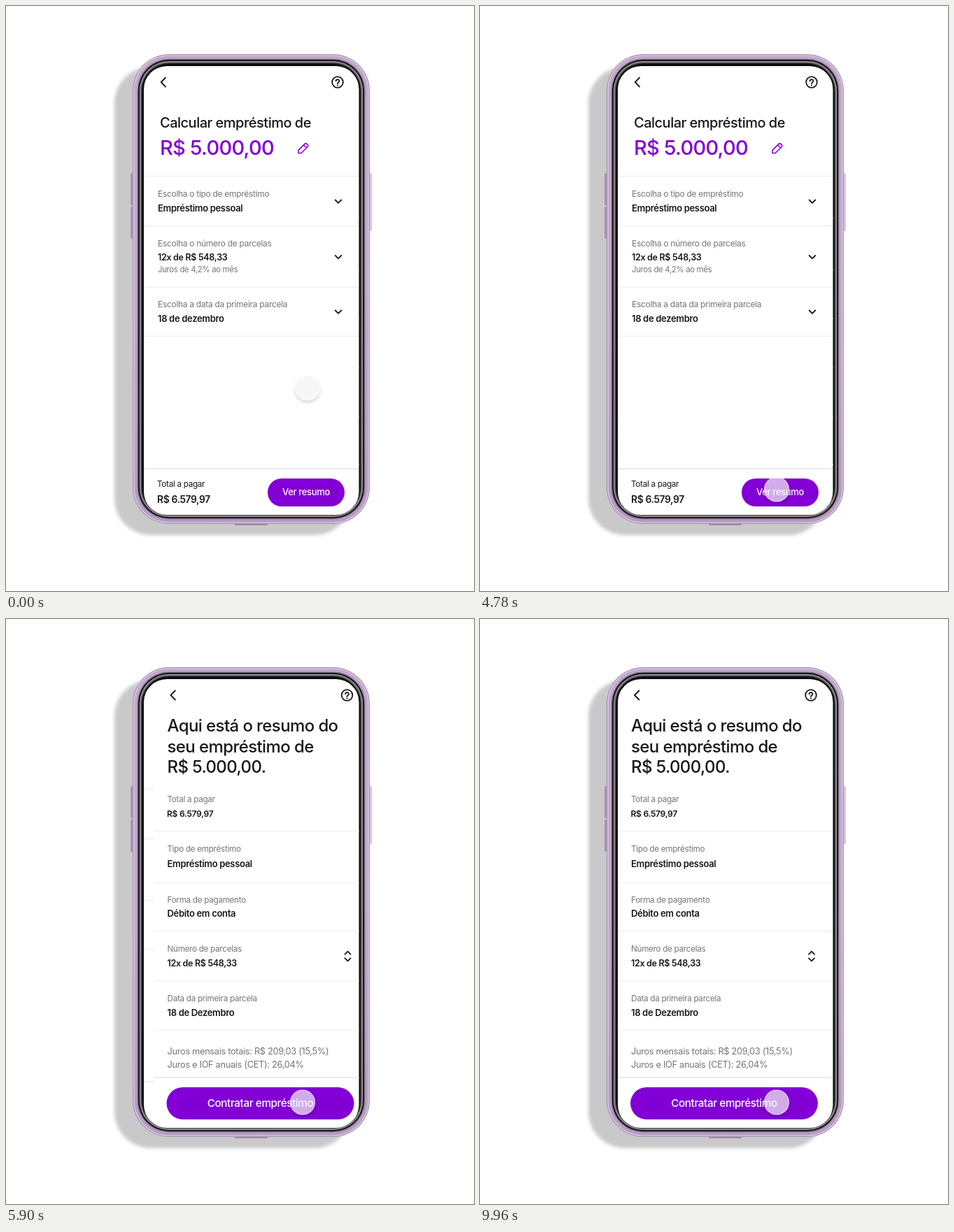
Animation, 669 px wide and 837 px high, one loop 9980 ms. Source, as an HTML page:

```html
<!DOCTYPE html>
<html lang="pt-BR">
<head>
<meta charset="utf-8">
<title>Empréstimo</title>
<style>
  html, body { margin: 0; width: 100%; height: 100%; overflow: hidden; background: #fff; }
  #stage { position: absolute; inset: 0; width: 669px; height: 837px; }
  svg { display: block; }
  text { font-family: Inter, Roboto, sans-serif; letter-spacing: -.025em; fill: #19171c; }
  .label { font-size: 12px; fill: #76737c; }
  .small { font-size: 11.7px; }
  .note { font-size: 12.8px; fill: #76737c; }
  .value { font-size: 13px; font-weight: 600; }
  .money { font-size: 12.5px; }
  .title { font-size: 24px; font-weight: 500; }
  .action { font-size: 13px; font-weight: 500; fill: #fff; text-anchor: middle; }
  .purple { fill: #8200d6; }
  .icon { fill: none; stroke: #19171c; stroke-width: 1.8; stroke-linecap: round; stroke-linejoin: round; }
  .rule { fill: none; stroke: #f0eff3; stroke-width: 1.5; }
  .bar { stroke: #ebeaee; stroke-width: 2; }
  #touch {
    position: absolute; left: -18px; top: -18px; width: 36px; height: 36px; box-sizing: border-box;
    border-radius: 50%; border: 1px solid rgba(255, 255, 255, .6);
    background: rgba(244, 244, 244, .7); box-shadow: 0 3px 4px rgba(0, 0, 0, .16);
  }
</style>
</head>
<body>
<div id="stage">
<svg width="669" height="837" viewBox="0 0 669 837">
  <defs>
    <filter id="soft" x="-10%" y="-10%" width="120%" height="120%"><feGaussianBlur stdDeviation="2.5"/></filter>
    <linearGradient id="metal" x2="0" y2="1">
      <stop offset="0" stop-color="#c0a8cb"/>
      <stop offset=".5" stop-color="#c3a7d0"/>
      <stop offset="1" stop-color="#b59cc1"/>
    </linearGradient>
    <clipPath id="screen"><rect x="197" y="86" width="307.5" height="642" rx="33"/></clipPath>
    <path id="back" class="icon" d="M228 102.500l-6.300 6.500 6.300 6.500"/>
    <path id="down" class="icon" d="M-4.300-2L0 2.300 4.300-2"/>
    <g id="help">
      <circle class="icon" r="7.800"/>
      <path class="icon" stroke-width="1.500" d="M-2.400-1.700a2.400 2.300 0 1 1 3.700 2Q0 1 0 2"/>
      <circle cy="4.500" r="1.050" fill="#19171c"/>
    </g>
  </defs>

  <rect x="155" y="87" width="338" height="670" rx="52" fill="#c9c9c9" filter="url(#soft)"/>

  <g fill="#a893b3">
    <rect x="178" y="239" width="6" height="46" rx="1.500"/>
    <rect x="178" y="287" width="6" height="46" rx="1.500"/>
    <rect x="517" y="239" width="6" height="83" rx="1.500" fill="#d9c2e6"/>
    <rect x="327" y="739" width="47" height="4" rx="1" fill="#9c8ca4"/>
  </g>
  <g id="body"></g>
  <rect x="197" y="86" width="307.500" height="642" rx="33" fill="#fff"/>

  <g clip-path="url(#screen)">
    <g id="form">
      <use href="#back"/>
      <use href="#help" x="474" y="109"/>
      <text x="220" y="174" class="title" style="font-size:20px">Calcular empréstimo de</text>
      <text x="220" y="213" class="title purple" style="font-size:29px">R$ 5.000,00</text>
      <g transform="translate(424.500 204) rotate(-45)" fill="none" stroke="#8200d6" stroke-width="1.500" stroke-linejoin="round">
        <path d="M-9.300 0l3-2.900H6.500a2 2 0 0 1 2 2V.9a2 2 0 0 1-2 2H-6.300zM4.300-2.900V2.900"/>
      </g>
      <path class="rule" d="M197 243.500h307M197 314.500h307M197 402.500h307M197 472.500h307"/>

      <text x="217" y="273" class="label">Escolha o tipo de empréstimo</text>
      <text x="217" y="293.500" class="value">Empréstimo pessoal</text>
      <use href="#down" x="475" y="279.500"/>

      <text x="217" y="344" class="label">Escolha o número de parcelas</text>
      <text x="217" y="364" class="value money">12x de R$ 548,33</text>
      <text x="217" y="381" class="label" style="font-size:11.3px">Juros de 4,2% ao mês</text>
      <use href="#down" x="475" y="359"/>

      <text x="217" y="431" class="label">Escolha a data da primeira parcela</text>
      <text x="217" y="451.500" class="value">18 de dezembro</text>
      <use href="#down" x="475" y="437.500"/>

      <path class="rule bar" d="M197 662h307"/>
      <text x="216" y="688" class="small">Total a pagar</text>
      <text x="216" y="710.500" class="value" style="font-size:13.8px">R$ 6.579,97</text>
      <rect x="374" y="676" width="110" height="40" rx="20" class="purple"/>
      <text x="429" y="700" class="action">Ver resumo</text>
    </g>

    <g id="summary" transform="translate(307)">
      <use href="#back" x="-.700"/>
      <use href="#help" x="473" y="109"/>
      <text class="title">
        <tspan x="216" y="160.500">Aqui está o resumo do</tspan>
        <tspan x="216" y="190.500">seu empréstimo de</tspan>
        <tspan x="216" y="219.500">R$ 5.000,00.</tspan>
      </text>
      <path class="rule" d="M197 303.500h307M197 377.500h307M197 447h307M197 517.500h307M197 588.500h307"/>

      <text x="216" y="262" class="label small">Total a pagar</text>
      <text x="215.500" y="282.500" class="value" style="font-size:12.1px">R$ 6.579,97</text>
      <text x="216" y="333" class="label small">Tipo de empréstimo</text>
      <text x="216" y="355" class="value">Empréstimo pessoal</text>
      <text x="216" y="406" class="label small">Forma de pagamento</text>
      <text x="216" y="426" class="value">Débito em conta</text>
      <text x="216" y="476" class="label small">Número de parcelas</text>
      <text x="216" y="497" class="value money">12x de R$ 548,33</text>
      <path class="icon" d="M470 479.700l4-4 4 4M470 485.300l4 4 4-4"/>
      <text x="216" y="547" class="label small">Data da primeira parcela</text>
      <text x="216" y="567.500" class="value">18 de Dezembro</text>
      <text x="216" y="622.500" class="note">Juros mensais totais: R$ 209,03 (15,5%)</text>
      <text x="216" y="641.500" class="note">Juros e IOF anuais (CET): 26,04%</text>

      <path class="rule bar" d="M197 656h307"/>
      <rect x="215" y="670" width="268" height="46" rx="23" class="purple"/>
      <text x="349" y="697.500" class="action" style="font-size:15.2px">Contratar empréstimo</text>
    </g>
  </g>
</svg>
<div id="touch"></div>
</div>

<script>
const LOOP = 9980;
const PAGE = 307;
const byId = id => document.getElementById(id);

// Nested rounded layers: lilac metal outside, dark bezel inside.
const layers = [
  [0, '#a790b3'], [1.2, '#dccbe5'], [2.6, 'url(#metal)'], [6.6, '#8d7c96'],
  [7.8, '#1c1a1e'], [10, '#a5a2a7'], [11.2, '#5b595d'], [13, '#0e0d0f']
];
byId('body').innerHTML = layers.map(([inset, fill]) =>
  `<rect x="${181 + inset}" y="${69 + inset}" width="${339 - 2 * inset}" height="${672 - 2 * inset}" rx="${52 - inset}" fill="${fill}"/>`
).join('');

// Steps come in threes, held for 100, 20 and 20 ms.
function stepAt(ms) {
  const shifted = ms + 120;
  const rest = shifted % 140;
  return 3 * Math.floor(shifted / 140) + (rest < 100 ? 0 : rest < 120 ? 1 : 2);
}

function ease(step, start, length) {
  const p = Math.min(1, Math.max(0, (step - start) / length));
  return (1 - Math.cos(Math.PI * p)) / 2;
}

const slideStart = stepAt(5200) + 0.2;
const touchStart = stepAt(3200) - 0.5;

function draw(ms) {
  const step = stepAt(ms);
  const slide = PAGE * ease(step, slideStart, 17.2);
  byId('form').setAttribute('transform', `translate(${-slide})`);
  byId('summary').setAttribute('transform', `translate(${PAGE - slide})`);

  const move = ease(step, touchStart, 7);
  byId('touch').style.transform = `translate(${431 - 7 * move}px, ${546.5 + 145 * move}px)`;
}

const begin = performance.now();
function tick() {
  draw((performance.now() - begin) % LOOP);
  requestAnimationFrame(tick);
}
tick();
</script>
</body>
</html>
```
